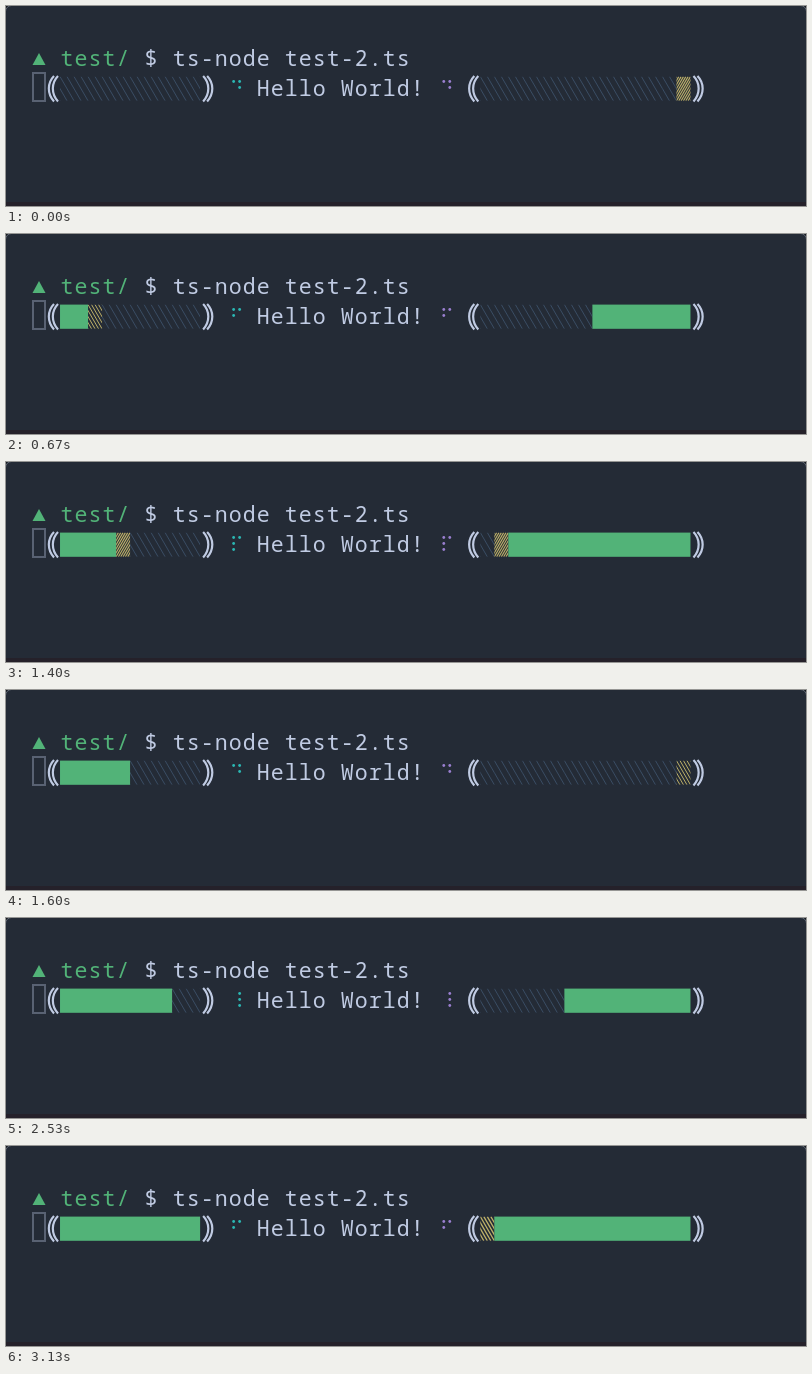
These frames come from a looping animation (800 px wide and 200 px high, 3.19 s). An HTML page with a canvas:

```html
<!DOCTYPE html>
<html lang="en">
<head>
<meta charset="utf-8">
<title>Terminal progress bars</title>
<style>
html, body { margin: 0; width: 100%; height: 100%; overflow: hidden; background: #242b36; }
canvas { display: block; }
</style>
</head>
<body>
<canvas id="stage" width="800" height="200"></canvas>
<script>
const ctx = document.getElementById('stage').getContext('2d');
const LOOP = 3190, CELL = 14.01, LEFT = 26, TOP = 70.6, HIGH = 24.2;
const BG = '#242b36', TEXT = '#c0cbe3', GREEN = '#52b378', YELLOW = '#bdb068', DIM = '#3a4d64';
const SPIN = '⠋⠙⠹⠸⠼⠴⠦⠧⠇⠏';

const cellX = col => LEFT + col * CELL;

// Terminal text: one character per grid cell
function write(str, col, y, color) {
  ctx.font = '21.6px "Noto Sans Mono", "DejaVu Sans Mono", monospace';
  ctx.textAlign = 'center';
  ctx.fillStyle = color;
  [...str].forEach((ch, i) => ctx.fillText(ch, cellX(col + i) + CELL / 2, y));
}

function hatch(col, color, count, weight, dir) {
  const x = cellX(col), gap = CELL / count;
  ctx.save();
  ctx.beginPath();
  ctx.rect(x, TOP, CELL, HIGH);
  ctx.clip();
  ctx.beginPath();
  for (let i = -count; i <= count * 2; i++) {
    const mid = x + i * gap;
    ctx.moveTo(mid - dir * CELL / 2, TOP);
    ctx.lineTo(mid + dir * CELL / 2, TOP + HIGH);
  }
  ctx.strokeStyle = color;
  ctx.lineWidth = weight;
  ctx.stroke();
  ctx.restore();
}

const shades = [
  col => hatch(col, DIM, 2, 1, 1),
  col => hatch(col, YELLOW, 4, 1, 1),
  col => hatch(col, YELLOW, 6, 1.1, -1),
  col => hatch(col, YELLOW, 4, 1.3, 1)
];

// Double parenthesis; side is 1 for opening, -1 for closing
function paren(col, side) {
  const mid = cellX(col) + CELL / 2 + (side < 0 ? 1 : 0);
  ctx.strokeStyle = TEXT;
  ctx.lineWidth = 2.2;
  ctx.beginPath();
  for (const dx of [-4.5, -0.5]) {
    const x = mid + side * dx;
    ctx.moveTo(x + side * 5.5, 70);
    ctx.bezierCurveTo(x - side * 1.4, 77, x - side * 1.4, 88, x + side * 5.5, 95.5);
  }
  ctx.stroke();
}

function bar(col, size, value, limits, reverse) {
  const whole = Math.floor(value);
  const level = limits.filter(v => value - whole >= v).length;
  const full = Math.min(size, whole + (level === 4 ? 1 : 0));
  for (let i = full; i < size; i++) {
    const at = col + (reverse ? size - 1 - i : i);
    shades[i === whole ? level : 0](at);
  }
  ctx.fillStyle = GREEN;
  ctx.fillRect(cellX(reverse ? col + size - full : col), TOP, full * CELL, HIGH);
  paren(col - 1, 1);
  paren(col + size, -1);
}

function spinner(col, step, color) {
  const bits = SPIN.charCodeAt(step % SPIN.length) - 0x2800;
  ctx.fillStyle = color;
  for (let d = 0; d < 6; d++) {
    if (!(bits >> d & 1)) continue;
    ctx.beginPath();
    ctx.arc(cellX(col) + (d < 3 ? 5.5 : 11.5), 75.5 + d % 3 * 6, 1.4, 0, Math.PI * 2);
    ctx.fill();
  }
}

function backdrop() {
  ctx.fillStyle = '#15191f';
  ctx.fillRect(0, 0, 800, 200);
  ctx.beginPath();
  ctx.roundRect(-0.5, -0.5, 801, 220, 6);
  ctx.fillStyle = BG;
  ctx.fill();
  ctx.strokeStyle = '#626974';
  ctx.lineWidth = 1;
  ctx.stroke();
  ctx.fillStyle = '#25212a';
  ctx.fillRect(0, 196, 800, 4);
}

function prompt() {
  ctx.fillStyle = GREEN;
  ctx.beginPath();
  ctx.moveTo(33, 47);
  ctx.lineTo(39.5, 59);
  ctx.lineTo(26.5, 59);
  ctx.fill();
  write('test/', 2, 60, GREEN);
  write('$ ts-node test-2.ts', 8, 60, TEXT);
  ctx.strokeStyle = '#596273';
  ctx.lineWidth = 2;
  ctx.strokeRect(27, 67, 12, 28);
}

function draw(t) {
  // 15 updates per second, on a 10 ms clock
  const step = Math.floor((Math.floor(t / 10) + 0.499) * 0.15);
  const time = step * 200 / 3;
  const p = 0.0198 + time / 3223;
  const turn = 1 + Math.floor((time + 60) / 80);

  backdrop();
  prompt();
  bar(2, 10, p * 10, [0.2, 0.52, 0.74, 0.86], false);
  spinner(14, turn, '#2bb8b4');
  write('Hello World!', 16, 90, TEXT);
  spinner(29, turn, '#9a7fd0');
  bar(32, 15, p * 2 % 1 * 15, [0.2, 0.52, 0.74, 0.79], true);
}

const start = performance.now();
function tick() {
  draw((performance.now() - start) % LOOP);
  requestAnimationFrame(tick);
}
tick();
</script>
</body>
</html>
```
